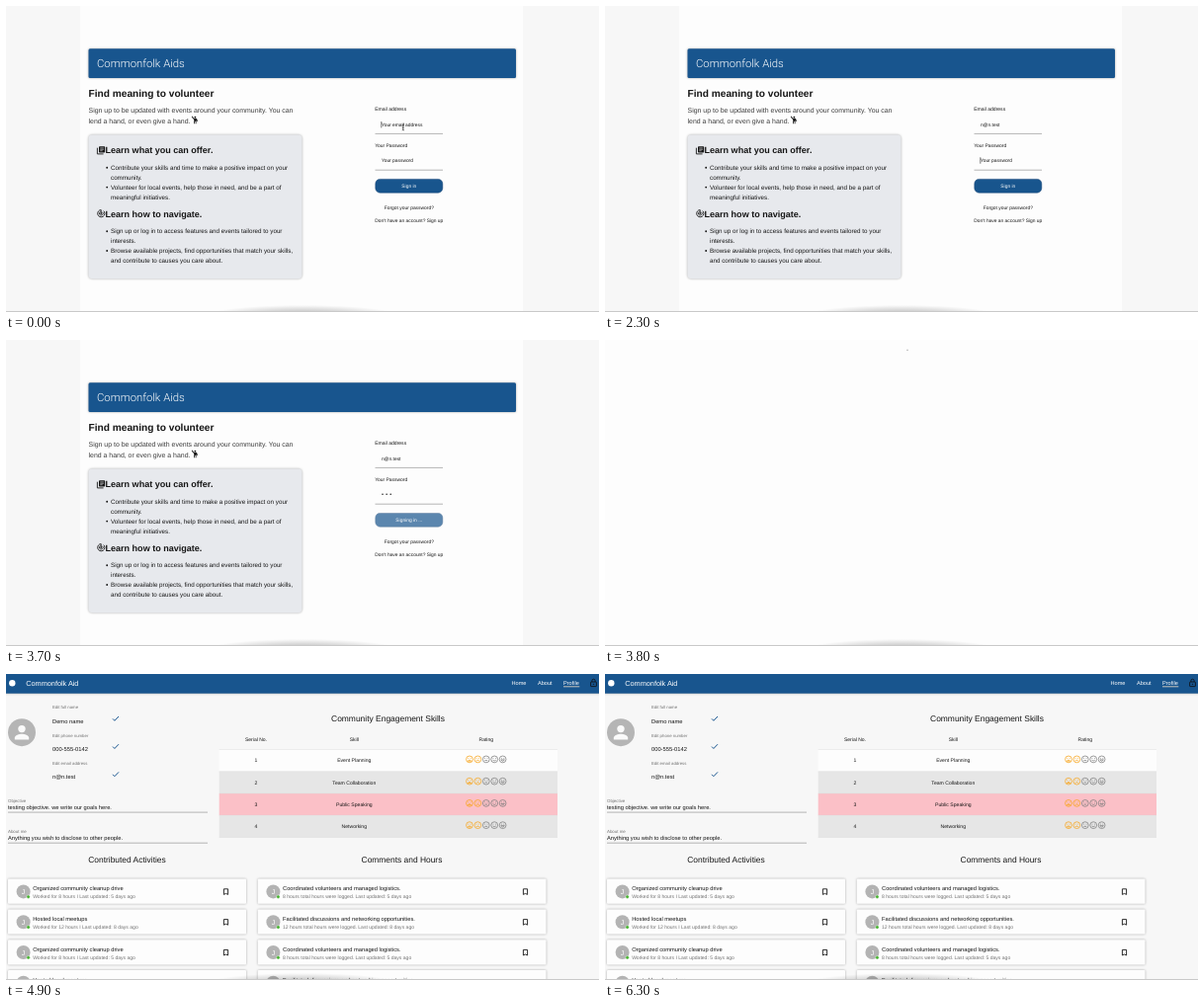
An HTML page for the animation above (6.4 s loop, 600 by 310 pixels).

```html
<!DOCTYPE html>
<html lang="en">
<head>
<meta charset="utf-8">
<title>Sign in and profile</title>
<style>
  html, body { margin: 0; width: 100%; height: 100%; overflow: hidden; background: #fdfdfd; }
  svg { display: block; width: 100%; height: 100%; }
  text { font-family: "Liberation Sans", Arial, sans-serif; fill: #161616; text-rendering: geometricPrecision; }
  .b { font-weight: 700; }
  .mid { text-anchor: middle; }
  .w { fill: #fff; }
  .grey { fill: #727272; }
  .soft { fill: #3c3c3c; }
  .light { font-family: Roboto, "Liberation Sans", sans-serif; font-weight: 300; fill: #fff; }
  .card { filter: drop-shadow(0 .8px .8px rgba(0, 0, 0, .32)); }
  .line { stroke: #858585; stroke-width: .6; }
  .ico { fill: none; stroke: #161616; stroke-width: .9; }
  .tick { fill: none; stroke: #18558f; stroke-width: 1; }
  .face { fill: none; stroke-width: .75; }
</style>
</head>
<body>
<svg viewBox="0 0 600 310" preserveAspectRatio="none">
  <defs>
    <radialGradient id="dock" cx=".5" cy="1" r="1" gradientTransform="translate(.5 1) scale(.5 1) translate(-.5 -1)">
      <stop offset="0" stop-color="#000" stop-opacity=".24"/>
      <stop offset=".55" stop-color="#000" stop-opacity=".17"/>
      <stop offset="1" stop-color="#000" stop-opacity="0"/>
    </radialGradient>
    <g id="person">
      <circle r="14" fill="#b5b5b5"/>
      <circle cy="-3.6" r="3.7" fill="#fafafa"/>
      <path d="M-7.2 7.2v-1.8c0-2.6 4.6-3.9 7.2-3.9s7.2 1.3 7.2 3.9v1.8z" fill="#fafafa"/>
    </g>
  </defs>
  <rect width="600" height="310" fill="#fdfdfd"/>

  <g id="login">
    <path d="M0 0H75V310H0zM523 0H600V310H523z" fill="#f7f7f7"/>
    <rect class="card" x="83.5" y="43.2" width="432.5" height="29.8" rx="1.5" fill="#18558e"/>
    <rect class="card" x="83.5" y="130.6" width="216" height="145.6" rx="4" fill="#e7e9ed"/>

    <!-- waving figure -->
    <g fill="#161616">
      <circle cx="191.4" cy="112.6" r=".9"/>
      <path d="M188.4 111.4l1.7 2.3h2.3q1.4.5 1.4 3.2h-.9l-.4-1.6v3.9h-.8v-2.2h-.7v2.2h-.8v-4.3q-1.6-1.2-2.4-3z"/>
    </g>
    <!-- stacked pages -->
    <path d="M92.4 143.7v6.2h6.2" class="ico"/>
    <rect x="94" y="142.2" width="6.2" height="6.2" rx=".7" fill="#161616"/>
    <path d="M95.3 143.9h3.6M95.3 145.3h3.6M95.3 146.7h2.3" stroke="#e7e9ed" stroke-width=".6"/>
    <!-- radar -->
    <g class="ico" transform="translate(96.2 210.2)">
      <path d="M2.6-2.6A3.6 3.6 0 1 1 0-3.6V0"/>
      <path d="M1.4-1.4A1.9 1.9 0 1 1-.6-1.8" stroke-width=".8"/>
      <circle r=".5"/>
    </g>

    <path class="line" d="M373.5 129.4H442M373.5 166.2H442"/>
    <rect id="button" x="373.8" y="175.4" width="68" height="13.8" rx="4.6" fill="#18558d" stroke="#103f70" stroke-width=".5"/>
    <text id="action" class="mid w" x="407.8" y="184.4" font-size="4.9"></text>
    <text id="email" x="379.9" y="121.8" font-size="4.88"></text>
    <text id="pass" x="379.9" y="158.4" font-size="4.88"></text>
    <g id="dots" fill="#161616">
      <circle cx="381" cy="156.3" r=".75"/>
      <circle cx="385.1" cy="156.3" r=".75"/>
      <circle cx="389.2" cy="156.3" r=".75"/>
    </g>
    <path id="caret" d="M0-3.2V3.2" stroke="#111" stroke-width=".6"/>
    <path id="beam" d="M400.8 119.7q1 0 1 .7 0-.7 1-.7M401.8 120.3V125.3M400.8 125.9q1 0 1-.7 0 .7 1 .7M401 123.3h1.6" fill="none" stroke="#111" stroke-width=".6"/>
  </g>

  <circle id="loader" cx="306" cy="10.2" r=".6" fill="#8a8a8a"/>

  <g id="profile">
    <rect width="600" height="310" fill="#f7f7f7"/>
    <rect class="card" x="-5" y="-5" width="610" height="24.7" fill="#18558e"/>
    <circle cx="6.3" cy="9.2" r="3.2" fill="#fff"/>
    <path d="M564 12.8H580.3" stroke="#f3dfc8" stroke-width=".8"/>
    <g fill="none" stroke="#10161d" stroke-width=".9">
      <rect x="591.6" y="8" width="5.8" height="4.6" rx=".5"/>
      <path d="M592.9 8V6.8a1.6 1.6 0 0 1 3.2 0V8"/>
      <circle cx="594.5" cy="10.3" r=".3"/>
    </g>
    <use href="#person" x="16" y="59.2"/>
    <path class="line" d="M2 140.1H204M2 171.2H204"/>
  </g>

  <ellipse cx="300" cy="309.4" rx="104" ry="6.5" fill="url(#dock)"/>
  <rect y="309" width="600" height="1" fill="#c9c9c9"/>
</svg>

<script>
const LOOP = 6400;
const MAIL = 'n@n.test';
const $ = id => document.getElementById(id);
const add = (id, html) => $(id).insertAdjacentHTML('beforeend', html);
const txt = (x, y, size, s, cls = '') =>
  `<text x="${x}" y="${y}" font-size="${size}" class="${cls}">${s}</text>`;

function loginText() {
  const item = (y, a, b) =>
    `<circle cx="102.2" cy="${y - 2.1}" r=".95" fill="#161616"/>` +
    txt(106, y, 6.28, a) + txt(106, y + 9.9, 6.28, b);
  return txt(92, 62.2, 11.3, 'Commonfolk Aids', 'light') +
    txt(83.5, 92.2, 10.16, 'Find meaning to volunteer', 'b') +
    txt(83.5, 108.3, 6.95, 'Sign up to be updated with events around your community. You can', 'soft') +
    txt(83.5, 119.4, 6.95, 'lend a hand, or even give a hand.', 'soft') +
    txt(100.5, 149.3, 9.04, 'Learn what you can offer.', 'b') +
    item(165.9, 'Contribute your skills and time to make a positive impact on your', 'community.') +
    item(185.7, 'Volunteer for local events, help those in need, and be a part of', 'meaningful initiatives.') +
    txt(100.5, 213.5, 9.04, 'Learn how to navigate.', 'b') +
    item(230.4, 'Sign up or log in to access features and events tailored to your', 'interests.') +
    item(250.1, 'Browse available projects, find opportunities that match your skills,', 'and contribute to causes you care about.') +
    txt(373.2, 106.2, 5.05, 'Email address') +
    txt(373.2, 142.8, 4.95, 'Your Password') +
    txt(407.8, 206.1, 4.93, 'Forgot your password?', 'mid') +
    txt(407.8, 219, 4.88, "Don't have an account? Sign up", 'mid');
}

const MOUTHS = [
  'M-1.7 1.8Q0-.6 1.7 1.8Z',
  'M-1.6 1.7Q0 .1 1.6 1.7',
  'M-1.4 1.2H1.4',
  'M-1.6 .8Q0 2.4 1.6 .8',
  'M-1.8 .5H1.8Q0 3.4-1.8 .5Z'
];

const face = (i, y) =>
  `<g class="face" stroke="${i < 2 ? '#f7a41d' : '#7c7c7c'}" transform="translate(${469 + i * 8.4} ${y})">
    <circle r="3.4"/><path d="${MOUTHS[i]}M-1.6-1h.8M.8-1h.8"/></g>`;

function skillTable() {
  const skills = ['Event Planning', 'Team Collaboration', 'Public Speaking', 'Networking'];
  const fills = ['#fdfdfd', '#e6e6e6', '#fbc0c7', '#e6e6e6'];
  let out = txt(386.5, 48.2, 8.45, 'Community Engagement Skills', 'mid') +
    txt(253, 68.2, 5.05, 'Serial No.', 'mid') +
    txt(352.3, 68.2, 5.05, 'Skill', 'mid') +
    txt(485.8, 68.2, 5.05, 'Rating', 'mid');
  skills.forEach((s, i) => {
    const y = 76.5 + i * 22.25;
    out += `<rect x="215.7" y="${y}" width="342.3" height="22.25" fill="${fills[i]}"/>
      <path d="M215.7 ${y}h342.3" stroke="#d6d6d6" stroke-width=".4"/>` +
      txt(253, y + 12.8, 5.1, i + 1, 'mid') +
      txt(352.3, y + 12.8, 5.1, s, 'mid') +
      MOUTHS.map((m, n) => face(n, y + 9.9)).join('');
  });
  return out + '<path d="M215.7 165.5h342.3" stroke="#d6d6d6" stroke-width=".4"/>';
}

function userForm() {
  const fields = [['full name', 'Demo name'], ['phone number', '000-555-0142'], ['email address', MAIL]];
  return fields.map(([label, value], i) => {
    const y = 35.4 + i * 28.2;
    return txt(47, y, 4.3, 'Edit ' + label, 'grey') + txt(47, y + 14.6, 5.78, value) +
      `<path class="tick" d="M108 ${y + 10}l1.9 1.9 4.1-4.3"/>`;
  }).join('') +
    txt(2, 130, 4.4, 'Objective', 'grey') +
    txt(2, 137.1, 5.72, 'testing objective. we write our goals here.') +
    txt(2, 160.9, 4.4, 'About me', 'grey') +
    txt(2, 168, 5.72, 'Anything you wish to disclose to other people.');
}

const card = (x, y, w, mark, title, note) =>
  `<rect class="card" x="${x}" y="${y}" width="${w}" height="25.2" rx="1" fill="#fdfdfd"/>
   <circle cx="${x + 15.6}" cy="${y + 12.8}" r="7" fill="#b3b3b3"/>` +
  txt(x + 15.6, y + 15.4, 7, 'J', 'mid w') +
  `<circle cx="${x + 20.6}" cy="${y + 18.1}" r="1.7" fill="#44b02c" stroke="#fff" stroke-width=".4"/>
   <path class="ico" stroke-width=".8" d="M${mark - 2.1} ${y + 10.2}h4.2v5.6l-2.1-1-2.1 1z"/>` +
  txt(x + 25.2, y + 11.5, 5.74, title) + txt(x + 25.2, y + 19.3, 5.05, note, 'grey');

function feeds() {
  let out = txt(122.5, 191.1, 8.42, 'Contributed Activities', 'mid') +
    txt(400.5, 191.1, 8.42, 'Comments and Hours', 'mid');
  for (let i = 0; i < 4; i++) {
    const y = 207.6 + i * 30.8, odd = i % 2;
    const hours = odd ? 12 : 8, when = `Last updated: ${odd ? 8 : 5} days ago`;
    out += card(2, y, 241, 222.5, odd ? 'Hosted local meetups' : 'Organized community cleanup drive',
      `Worked for ${hours} hours I ${when}`);
    out += card(254.8, y, 291.7, 525.5,
      odd ? 'Facilitated discussions and networking opportunities.' : 'Coordinated volunteers and managed logistics.',
      `${hours} hours total hours were logged. ${when}`);
  }
  return out;
}

add('login', loginText());
add('profile',
  txt(20.3, 11.7, 7.3, 'Commonfolk Aid', 'w') +
  txt(511.5, 11, 5.6, 'Home', 'w') + txt(538, 11, 5.6, 'About', 'w') + txt(564, 11, 5.6, 'Profile', 'w') +
  userForm() + skillTable() + feeds());

const KEYS = [400, 900, 1200, 1500, 1700, 1850, 2000, 2100];
const DOTS = [2700, 2800, 3000];
const SUBMIT = 3300, FADE = 250, LOAD = 3800, OPEN = 3900;

const show = (id, on) => { $(id).style.display = on ? '' : 'none'; };
const count = (times, t) => times.filter(k => t >= k).length;
const put = (id, s) => { if ($(id).textContent !== s) $(id).textContent = s; };

function draw(now) {
  const t = now % LOOP;
  show('login', t < LOAD);
  show('loader', t >= LOAD && t < OPEN);
  show('profile', t >= OPEN);
  if (t < LOAD) {
    const typed = count(KEYS, t), dots = count(DOTS, t), busy = t >= SUBMIT;
    put('email', typed ? MAIL.slice(0, typed) : 'Your email address');
    put('pass', dots ? '' : 'Your password');
    [...$('dots').children].forEach((d, i) => { d.style.display = i < dots ? '' : 'none'; });
    put('action', busy ? 'Signing in ...' : 'Sign in');
    $('button').style.opacity = 1 - .3 * Math.min(1, Math.max(0, (t - SUBMIT) / FADE));
    show('beam', t < KEYS[0]);
    show('caret', !busy);
    const inPass = t >= 2300;
    const x = inPass ? 379.8 + dots * 4.1
      : 379.8 + (typed ? $('email').getComputedTextLength() + .3 : 0);
    $('caret').setAttribute('transform', `translate(${x} ${inPass ? 156.5 : 120.2})`);
  }
  requestAnimationFrame(draw);
}
draw(performance.now());
</script>
</body>
</html>
```
